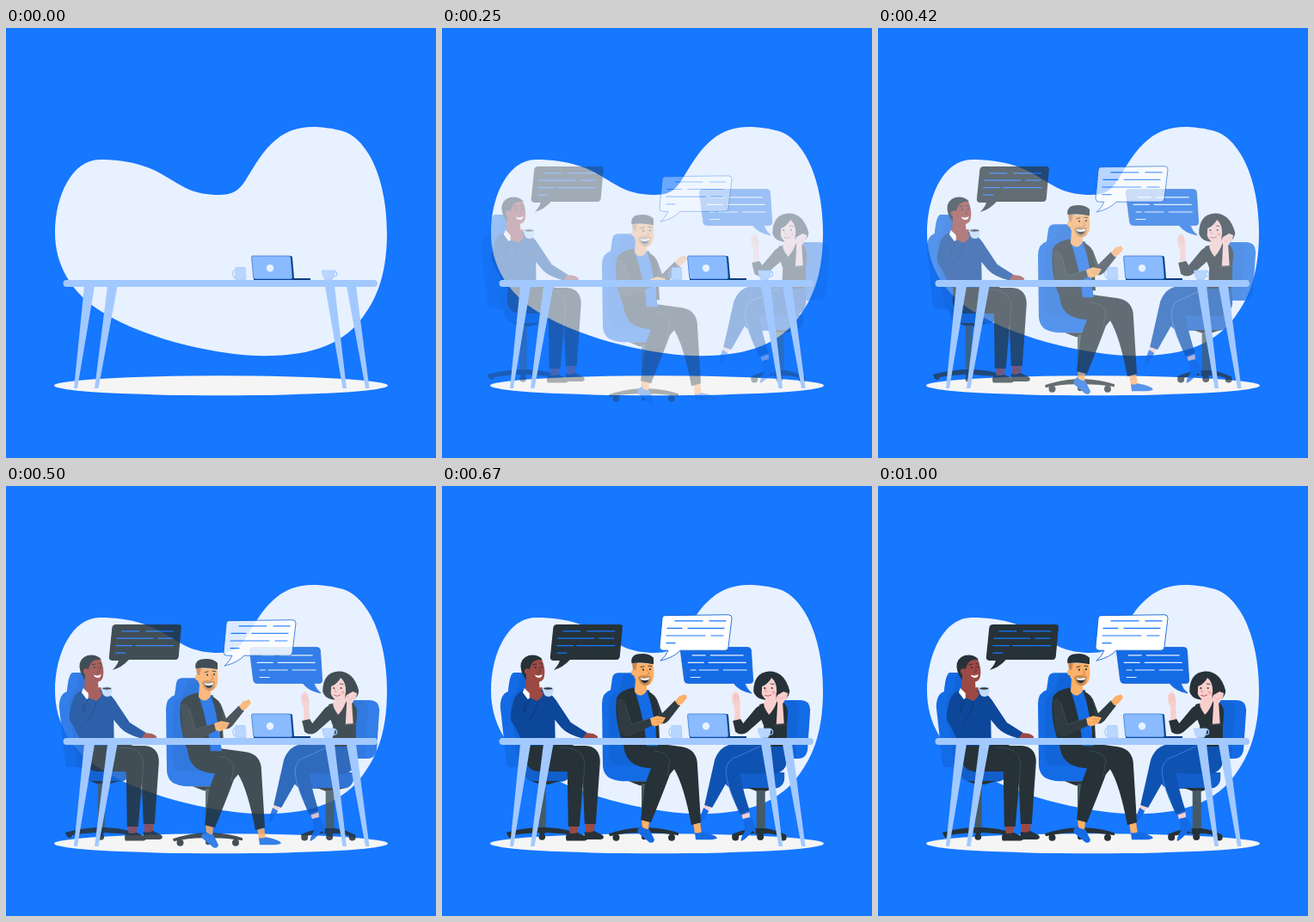
Write an HTML page that moves like this. It is 500 px wide and 500 px high and loops after 1.04 s.

```html
<!DOCTYPE html>
<html lang="en">
<head>
<meta charset="utf-8">
<title>Team meeting</title>
<style>
html, body { margin: 0; width: 100%; height: 100%; overflow: hidden; background: #1677ff; }
svg { display: block; width: 100vw; height: 100vh; }
.ink { fill: #263238; }
.sleeve { fill: #303b41; }
.sweater { fill: #0d4799; }
.jeans { fill: #0f53b2; }
.chair { fill: #146be6; }
.chair2 { fill: #1265d9; }
.seat { fill: #125fcc; }
.shoe { fill: #146be6; }
.brown { fill: #9c4944; }
.tan { fill: #fdb068; }
.pink { fill: #f9cfcd; }
.pale { fill: #fff; }
.table { fill: #a2c9ff; }
.line { fill: none; stroke-linecap: round; stroke-linejoin: round; }
</style>
</head>
<body>
<svg viewBox="0 0 500 500">
  <path fill="#e8f1ff" d="M57 238C57 195 77 153 109 153C148 153 171 163 188 174C207 185 218 194 248 194C272 194 275 182 289 160C304 137 321 115 357 115C366 115 376 116 388 119C421 126 443 177 443 238C443 292 428 318 415 336C394 365 360 381.300 300 381.300C252 381.300 167 364 113 331C75 308 57 275 57 238Z"/>
  <ellipse cx="250" cy="415.800" rx="194" ry="11.500" fill="#f5f5f5"/>

  <g id="left">
    <!-- chair -->
    <path class="chair" d="M84 217H102L112 327H80Q75 327 75 320L68 257Q68 242 77 239Q79 217 84 217Z"/>
    <path class="chair2" d="M92 218H102L112 327H89L80 258Q79 244 87 239Z"/>
    <path class="seat" d="M93 325H148V338Q146 344 136 344H106Q95 342 93 325Z"/>
    <path class="ink" d="M104 343H138L124 347H114Z"/>
    <rect x="113" y="346" width="8" height="54" fill="#455a64"/>
    <path class="ink" d="M75 403Q92 398 112 397H122Q140 398 149 401V405L121 403L117 406L112 403Q92 404 77 407Z"/>
    <circle class="ink" cx="80" cy="406" r="3"/><circle class="ink" cx="116.500" cy="408" r="3.800"/>
    <!-- legs -->
    <path class="brown" d="M148 393H159L158 405H149ZM167 391H178L177 404H167Z"/>
    <path class="ink" d="M134 302H167Q184 303 184 321L179 393H166L163 320ZM166 402Q172 404 177 401L187 406Q190 410 185 411H166Z"/>
    <path class="ink" d="M99 300H146Q166 302 166 323L160 396H147L146 332H112Q97 330 98 314ZM146 403Q152 405 158 403L169 408Q170 412 166 412.500H145Q143 408 146 403Z"/>
    <path class="line" stroke="#4a5a62" stroke-width=".6" d="M139 304Q165 304 166 323L163 365"/>
    <!-- far arm -->
    <path class="sweater" d="M122 241Q130 243 136 254L150 275L169 287L165 294Q146 289 139 281L124 263Z"/>
    <path class="brown" d="M168 287L176 288Q183 291 181 293H164Z"/>
    <!-- torso -->
    <path class="sweater" d="M96 237Q84 241 82 256Q77 272 84 278L92 294L97 302H132L131 247Q127 241 115 236Z"/>
    <path class="brown" d="M98 221L97 240Q106 248 114 239L113 226Z"/>
    <path class="pale" d="M96 235L106 245L100 248L94 240ZM114 236L116 241L109 245Z"/>
    <!-- head -->
    <path class="brown" d="M97 206Q104 198 116 201Q121 212 119 222Q117 229 109 228Q100 227 97 217Z"/>
    <path class="ink" d="M98 226Q90 214 92 206Q95 196.500 106 196.500Q114 197 117 202Q110 201 106 204.500Q103 208 102 213L99 212L98 218Z"/>
    <circle class="brown" cx="99" cy="215.500" r="3"/>
    <path class="pale" d="M108 219.500Q113 221.500 117 219Q116 223.500 112.500 223Q109 222.500 108 219.500Z"/>
    <g class="ink"><circle cx="109" cy="211" r="1"/><circle cx="116" cy="210.500" r="1"/></g>
    <path class="line" stroke="#263238" stroke-width=".9" d="M106 208L110 207M114 206.500L117 207"/>
    <path class="line" stroke="#6e2f2d" stroke-width=".8" d="M113 211L115 216L112 216.500"/>
    <!-- near arm with cup -->
    <path class="sweater" d="M85 250Q94 247 96 262L102 246L112 250Q107 267 97 276Q87 281 83 276Z"/>
    <path class="line" stroke="#0a3677" stroke-width=".8" d="M96 253V263L101 249M98 276Q109 266 111 251"/>
    <path class="brown" d="M102 246Q101 238 106 236L116 234Q119 235 115 238L118 241Q117 246 111 250Z"/>
    <path fill="#c4dcfb" d="M117 235H130Q130 245 124 245Q118 245 117 235Z"/>
    <ellipse class="ink" cx="123.500" cy="235.500" rx="5.500" ry="1.700" stroke="#c4dcfb"/>
    <!-- bubble -->
    <path class="ink" d="M134 161H207Q210.500 161 210 165L207 198Q206.500 202 203 202H149Q141 211 130 214Q136 208 137 203H130Q126 203 126 199L129.500 165Q130 161 134 161Z"/>
    <path class="line" stroke="#1677ff" stroke-width="1.200" d="M141 168.800H161M169 168.800H201M135 177.200H177M183 177.200H200M134 185.700H153M157 185.700H201M134 194.200H145"/>
  </g>

  <g id="right">
    <!-- chair -->
    <path class="chair" d="M390 249H417Q427 249 428 260L425 305Q424 317 414 317H392Z"/>
    <path class="chair2" d="M390 250H408Q415 251 415 262L411 316H392Z"/>
    <path class="seat" d="M325 333H398V341Q396 352 384 352H338Q327 350 325 333Z"/>
    <path class="ink" d="M355 351H387L376 355H366Z"/>
    <rect x="365.500" y="354" width="10" height="46" fill="#455a64"/>
    <path class="ink" d="M337 405Q350 399 365 398H376Q390 400 400 406L397 409Q388 404 375 404L370 407L364 404Q351 404 338 409Z"/>
    <g class="ink"><circle cx="341" cy="408.500" r="4"/><circle cx="370" cy="408" r="4"/><circle cx="396.500" cy="408.500" r="4"/></g>
    <!-- legs -->
    <path class="pink" d="M306 369L314 372L309 379L304 376ZM347 379L357 377L358 386L350 388Z"/>
    <path class="shoe" d="M304 374L310 378Q304 390 300 391Q299 386 304 374ZM350 387L358 385Q367 396 364 405L361 401Q354 410 348 413Q346 411 352 401Z"/>
    <path class="jeans" d="M374 300H338Q323 302 317 318L305 371L314 374L335 337L375 326Z"/>
    <path class="jeans" d="M400 300L401 320Q399 335 381 335L346 334Q351 359 358 379L347 383Q332 352 330 334Q329 318 347 313L372 300Z"/>
    <path class="line" stroke="#5d98ec" stroke-width=".6" d="M369 303L345 314Q329 318 330 334Q332 350 340 367M347 382L358 378"/>
    <!-- far arm -->
    <path class="pink" d="M340 257Q336 251 337 243L341 239L344 241Q348 250 346 257L347 274L340 276Z"/>
    <path class="line" stroke="#e6a9a9" stroke-width=".6" d="M340 243L341 250M343 243L344 250"/>
    <path class="ink" d="M338 273L347 271L350 276L365 258Q372 252 378 256L372 271L355 286Q348 291 341 286Z"/>
    <!-- body and head -->
    <path class="ink" d="M369 254L388 249Q401 250 402 263L399 303H373L374 279Q367 263 369 254Z"/>
    <path class="ink" d="M362 239Q362 217 380 215.500Q398 215 404 238Q404 245 397 249L388 251L372 248Q364 246 362 239Z"/>
    <path class="pink" d="M377 245L388 242L389 251Q386 260 380 266Q374 258 374 253Z"/>
    <path class="pink" d="M372 233Q379 230 383 223Q389 228 389 239Q388 248.500 381 249Q373 248 371.500 241Z"/>
    <path class="line" stroke="#263238" stroke-width=".8" d="M373 231.500L376 230.500M382 230L386 230.500"/>
    <path class="line" stroke="#d98d8d" stroke-width=".7" d="M377 235L375.500 239L378 239.500"/>
    <g class="ink"><circle cx="375" cy="235" r="1"/><circle cx="383.500" cy="235" r="1"/></g>
    <path class="line" stroke="#b9484f" stroke-width=".9" d="M375.500 243.500Q379 245.500 382.500 243"/>
    <circle cx="385.500" cy="240" r="2" fill="#f2aaa8"/>
    <!-- near arm -->
    <path class="pink" d="M390 252Q387 247 390 243L397 239L402 241L401 245L396 253L398 284L388 287Z"/>
    <path class="line" stroke="#e6a9a9" stroke-width=".7" d="M394 249L400 242M390 244L393 248"/>
    <path class="ink" d="M386 277L400 276L401 294Q390 298 385 291Z"/>
    <path class="line" stroke="#4a5a62" stroke-width=".6" d="M386 278L400 277"/>
    <!-- bubble -->
    <path fill="#146be6" stroke="#125fcc" stroke-width=".7" d="M281 187.500H355Q359 187.500 359.300 191L361.500 226Q361.500 229.500 358 229.500H352Q354 236 360 241Q345 238 339 229.500H286Q282 229.500 281.500 226L277 191Q277 188 281 187.500Z"/>
    <path class="line" stroke="#e8f1ff" stroke-width="1.200" d="M291 196.800H306M312 196.800H350M286 205.400H304M310 205.400H353M289 214H295M299 214H321M327 214H354M289 222.500H300"/>
  </g>

  <g id="mid">
    <!-- chair -->
    <path class="chair" d="M205 217H224L250 342H206Q188 341 187 325L186 253Q186 240 196 237L198 223Q199 217 205 217Z"/>
    <path class="chair2" d="M212 218H224L244 328H208Q194 325 194 312V254Q195 242 205 239Z"/>
    <path class="chair" d="M188 325H250V343H210Q190 342 188 325Z"/>
    <path class="ink" d="M217 343H252L241 348H230Z"/>
    <rect x="232" y="346" width="8" height="54" fill="#455a64"/>
    <path class="ink" d="M194 404Q212 398 230 397H241Q260 398 275 403V406Q257 403 241 403L235 408L229 403Q212 403 195 407Z"/>
    <g class="ink"><circle cx="202.500" cy="408.500" r="4"/><circle cx="267" cy="408.500" r="4"/><circle cx="235" cy="408" r="3"/></g>
    <!-- legs -->
    <path class="tan" d="M232 387L241 389L240 401L233 399ZM292 391L300 390L302 404L294 404Z"/>
    <path class="shoe" d="M231 395Q236 399 241 399L247 411Q246 416 241 414L228 403Q226 400 231 395ZM294 403Q299 404 302 402Q318 405 320 409Q318 411 309 411H295Z"/>
    <path class="ink" d="M211 299C212 319 224 327 243 328L236 347L231 388L243 391Q258 354 265 335L270 329Q281 347 290 394L301 391L297 325Q297 306 279 303L250 299Z"/>
    <path class="line" stroke="#4a5a62" stroke-width=".6" d="M247 308Q262 309 265 319L262 337"/>
    <!-- far arm -->
    <path class="sleeve" d="M240 239Q249 242 252 253L256 264L271 249L277 255L263 273Q257 279 250 274L240 260Z"/>
    <path class="tan" d="M271 250L276 244L283 242L285 246L280 252L275 255Z"/>
    <!-- torso -->
    <path class="shoe" d="M221 236L241 237L251 302H222Z"/>
    <path class="ink" d="M223 234Q207 237 203 246Q200 268 209 296L213 304H238Q236 272 223 234ZM238 237Q248 243 251 255L253 294H249Q248 265 238 237Z"/>
    <path class="tan" d="M225 224L224 239Q231 248 238 238L238 227Z"/>
    <!-- head -->
    <path class="tan" d="M222 206H245Q248 218 245 226Q241 234 234 232Q225 229 222 217Z"/>
    <circle class="tan" cx="223.500" cy="216.500" r="3.500"/>
    <path fill="#c98a4e" d="M228 222Q231 219 237 220L243 221L242 228Q239 233 234 231.500Q229 229 228 222Z"/>
    <path class="ink" d="M230.500 222.500Q236 224.500 241.500 222Q240 229 235.500 229Q231 227.500 230.500 222.500Z"/>
    <path class="pale" d="M230.500 222.500Q236 224.500 241.500 222L240.500 225Q235 226.500 231.500 225Z"/>
    <path class="ink" d="M220.500 206Q219 198 226 195.500Q240 193 246 199.500L246 207Q233 204 220.500 206Z"/>
    <path fill="#c9874f" d="M221 206L227 205.500L225 214L222 213Z"/>
    <g class="ink"><circle cx="234" cy="213.500" r="1.100"/><circle cx="242" cy="213" r="1.100"/></g>
    <path class="line" stroke="#263238" stroke-width=".9" d="M231 210.500L235 209.500M240 209L244 209.500"/>
    <path class="line" stroke="#c9773a" stroke-width=".8" d="M239 214L241 218.500L238 219"/>
    <!-- near arm -->
    <path class="sleeve" d="M203.500 248Q211 244 214 255L220 277L242 270L245 278L220 290Q209 293 206 283Z"/>
    <path class="line" stroke="#4a5a62" stroke-width=".6" d="M213 253L220 277L242 270"/>
    <path class="tan" d="M242 270L250 267L260 269L256 276L249 279L244 278Z"/>
    <path class="line" stroke="#d98a4b" stroke-width=".6" d="M250 271L257 271M250 274L255 274"/>
    <!-- bubble -->
    <path class="pale" stroke="#1265d9" stroke-width=".9" d="M259 150.500Q256 150.500 256 154.500L253 187Q253 191 257 191H263Q260 198 254 203Q270 199 277 191H329Q333 191 333 187L337 153.500Q337 149.500 333 149.500Z"/>
    <path class="line" stroke="#1677ff" stroke-width="1.200" d="M271 156.700H303M311 156.700H330M262 165.200H279M286 165.200H328M261 173.800H306M313 173.800H327M261 182.500H271"/>
  </g>

  <!-- table and items -->
  <rect class="table" x="66.500" y="293" width="365.500" height="8" rx="4"/>
  <path class="table" d="M91 300H103L83 419H79ZM118 300H129.500L107.500 419H103ZM371 300H382L396 419H391.500ZM396 300H407L422.500 419H418Z"/>
  <path fill="#0b3c80" d="M288 265H331Q333 265 333 267L335 291H354V293H288Z"/>
  <path fill="#8abbff" stroke="#125fcc" stroke-width=".6" d="M287 265H329Q331 265 331.200 267L333 290Q333 292 331 292H290Q288 292 287.700 290L285.500 267Q285.500 265 287 265Z"/>
  <circle cx="307" cy="279.200" r="4.200" fill="#e8f1ff"/>
  <g fill="none" stroke="#a2c9ff" stroke-width="1.200">
    <ellipse cx="267.500" cy="286" rx="3.700" ry="5"/>
    <circle cx="381.500" cy="286" r="3.200"/>
    <path fill="#b9d6ff" stroke-width=".7" d="M267 278.500H278L279 291Q279 293 276 293H269Q266.500 293 266.500 290Z"/>
    <path fill="#b9d6ff" stroke-width=".7" d="M367.500 282H382.500Q382 289 379 292.500H371Q368 289 367.500 282Z"/>
  </g>
</svg>
<script>
const LOOP = 1040, STEP = 1000 / 24;
// [step, value] pairs, linear in between
const slide = [[0, 28.5], [3, 27], [6, 22.3], [8, 17], [10, 11.2], [12, 6.2], [13, 4.2],
  [14, 2.6], [16, 0.2], [18, -1.3], [20, -1.7], [22, -1.2], [24, 0.2]];
const fade = [[0, 0], [3, 0.15], [6, 0.36], [10, 0.69], [12, 0.85], [14, 1], [24, 1]];
const dirs = { left: [-1, 0], mid: [0, 1], right: [1, 0] };

function at(keys, k) {
  const i = Math.max(1, keys.findIndex(p => p[0] >= k));
  const [a, u] = keys[i - 1], [b, v] = keys[i];
  return u + (v - u) * (k - a) / (b - a);
}

function draw(now) {
  const k = Math.min(24, Math.floor((now % LOOP + 5) / STEP));
  const d = at(slide, k), alpha = at(fade, k);
  for (const id in dirs) {
    const [x, y] = dirs[id], g = document.getElementById(id);
    g.setAttribute("transform", `translate(${x * d} ${y * d})`);
    g.setAttribute("opacity", alpha);
  }
}

const start = performance.now();
function tick() {
  draw(performance.now() - start);
  requestAnimationFrame(tick);
}
tick();
</script>
</body>
</html>
```
